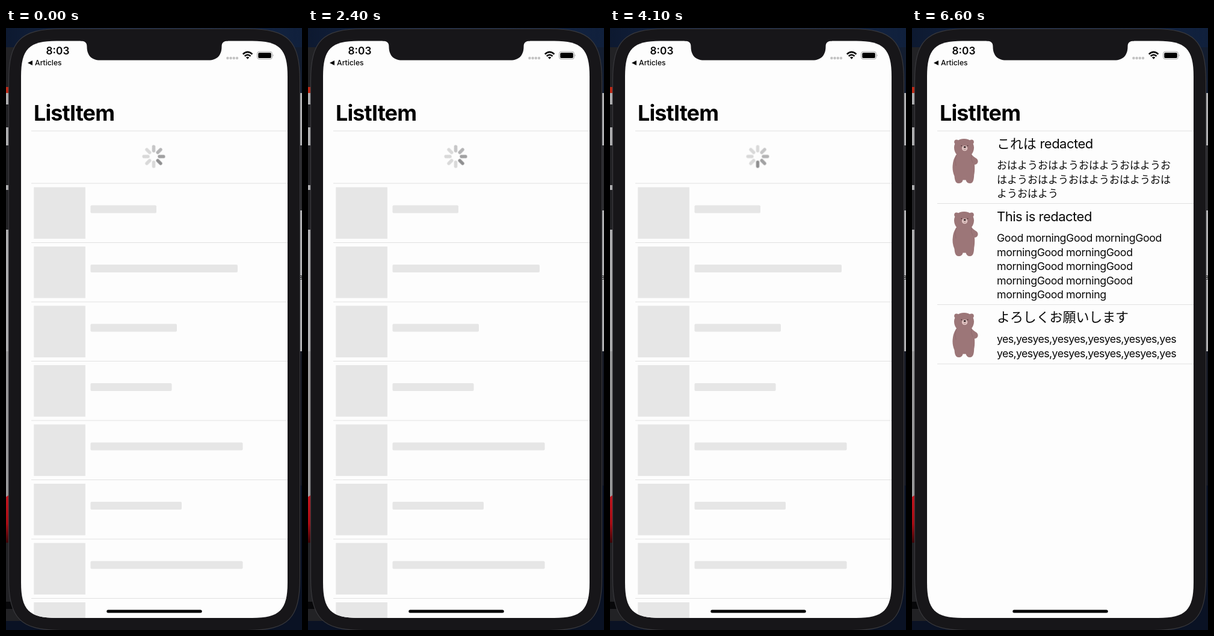
An HTML page for the animation above (6.7 s loop, 492 by 1000 pixels).

```html
<!DOCTYPE html>
<html lang="en">
<head>
<meta charset="utf-8">
<title>Loading list</title>
<style>
  html, body { margin: 0; width: 100%; height: 100%; overflow: hidden; background: #0a1224; }
  svg { display: block; width: 100vw; height: 100vh; }
  text { font-family: Inter, "Noto Sans CJK JP", "Noto Sans CJK", sans-serif; fill: #080808; white-space: pre; }
  .clock { font-size: 17.3px; font-weight: 600; }
  .back { font-size: 12.2px; font-weight: 500; }
  .title { font-size: 36px; font-weight: 700; letter-spacing: -.9px; fill: #000; }
  .head { font-size: 22px; letter-spacing: -.5px; }
  .body { font-size: 17.8px; letter-spacing: -.4px; }
  .yes { letter-spacing: -.62px; }
  .jp { font-size: 17px; letter-spacing: 0; }
  .jp-head { letter-spacing: -.1px; }
  .lines { stroke: #e1e1e1; stroke-width: 1.1; fill: none; }
  .blocks { fill: #e6e6e6; }

  /* one shared 6.7 s clock, nudged so steps land just before each tick */
  .loading, .loaded, .spinner, .cursor { animation: 6.7s linear -10ms infinite; }
  .loading { animation-name: hide; animation-timing-function: step-end; }
  .loaded { animation-name: show; animation-timing-function: step-end; }
  .spinner { animation-name: spin; transform-origin: 0 0; }
  .cursor { animation-name: point; }

  @keyframes hide { 0% { visibility: visible } 62.6866%, 100% { visibility: hidden } }
  @keyframes show { 0% { visibility: hidden } 62.6866%, 100% { visibility: visible } }
  @keyframes spin {
    0% { transform: rotate(135deg); animation-timing-function: steps(29) }
    43.2836% { transform: rotate(1440deg); animation-timing-function: step-end }
    46.2687% { transform: rotate(1530deg); animation-timing-function: steps(11) }
    62.6866%, 100% { transform: rotate(2025deg) }
  }
  @keyframes point {
    0% { transform: translate(476px, 652px); visibility: hidden; animation-timing-function: step-end }
    37.3134% { transform: translate(476px, 652px); visibility: visible; animation-timing-function: ease-out }
    41.791% { transform: translate(152px, 526px); visibility: visible }
    49.2537% { transform: translate(152px, 526px); visibility: visible; animation-timing-function: ease-in }
    53.7313%, 100% { transform: translate(476px, 652px); visibility: hidden }
  }
</style>
</head>
<body>
<svg viewBox="0 0 492 1000" preserveAspectRatio="none">
  <defs>
    <linearGradient id="sky" x2="1" y2="0">
      <stop stop-color="#0d1930"/><stop offset=".4" stop-color="#182a4c"/><stop offset="1" stop-color="#10203c"/>
    </linearGradient>
    <linearGradient id="red" x2="0" y2="1">
      <stop stop-color="#c21620"/><stop offset=".6" stop-color="#a80c14"/><stop offset="1" stop-color="#3a0508"/>
    </linearGradient>
    <path id="display" d="M25 80.5C25 34.7 38.2 21.5 84 21.5H409C454.8 21.5 468 34.7 468 80.5V921C468 966.8 454.8 980 409 980H84C38.2 980 25 966.8 25 921Z"/>
    <clipPath id="screen"><use href="#display"/></clipPath>
    <rect id="spoke" x="-2.7" y="-19" width="5.4" height="12.2" rx="2.7"/>
    <rect id="thumb" x="46.3" y="264.5" width="85.6" height="85.6"/>
    <g id="bear">
      <g fill="#9c7678">
        <circle cx="74" cy="189.3" r="3.8"/><circle cx="99" cy="189.3" r="3.8"/>
        <path d="M86.5 184C96 184 103 190 103 198.5C103 203 101.500 207 99 210C102 214 105 215 107.5 217C111.500 220.500 109.5 227 104 227C104.300 231 104.5 238 103.2 244C103 251 102 258 96.500 258C92.5 258 90.5 256 89.5 252.5H84.5C84 256 81.5 258 77.5 258C72 258 71 252 70.5 246C67.5 239 66.800 232 68 225C69 218 71.5 213.500 74 210C71.5 207 70 203 70 198.5C70 190 77 184 86.5 184Z"/>
      </g>
      <path d="M73.5 211Q71 220 73 229M99 210Q97 218 101 224" fill="none" stroke="#8e696c" stroke-width=".8"/>
      <ellipse cx="87.6" cy="199.7" rx="4.7" ry="4.5" fill="#e0c4c2"/>
      <ellipse cx="87.7" cy="197.7" rx="2" ry="1.5" fill="#352628"/>
      <path d="M85.8 201Q87.7 203 89.6 201" fill="none" stroke="#81595c" stroke-width=".7"/>
      <circle cx="82.3" cy="195.6" r=".8" fill="#3c292b"/><circle cx="92.6" cy="195.6" r=".8" fill="#3c292b"/>
    </g>
  </defs>

  <!-- desktop behind the phone -->
  <rect width="492" height="1000" fill="#0a1224"/>
  <rect width="492" height="32" fill="url(#sky)"/>
  <g>
    <path d="M0 32H25V985H0Z" fill="#222225"/>
    <path d="M0 98H25V108H0Z" fill="#bd2a18"/>
    <path d="M0 108H25V127H0ZM0 165H25V195H0ZM0 261H25V269H0ZM0 335H25V537H0Z" fill="#adadaf"/>
    <path d="M0 537H25V780H0Z" fill="#98989a"/>
    <path d="M0 779L6 775V855H0Z" fill="url(#red)"/>
    <path d="M0 953H25V965H0Z" fill="#08080a"/>
    <path d="M470 32H492V108H470Z" fill="#131d30"/>
    <path d="M470 108H492V195H470ZM470 303H492V537H470Z" fill="#b2b2b4"/>
    <path d="M470 195H492V303H470Z" fill="#2b2b2e"/>
    <path d="M470 537H492V760H470Z" fill="#141823"/>
    <text x="487.5" y="418" font-size="9">8</text>
  </g>

  <!-- phone -->
  <path d="M4.5 88.5C4.5 21 24 1.5 91.5 1.5H401.5C469 1.5 488.5 21 488.5 88.5V913.5C488.5 981 469 1000.5 401.5 1000.5H91.5C24 1000.5 4.5 981 4.5 913.5Z" fill="#171619" stroke="#39393d" stroke-width="1.2"/>
  <use href="#display" fill="#fdfdfd"/>
  <path d="M124 20V21.5C131 21.5 134.5 24 134.5 31C134.5 46 143 53.5 156 53.5H337C350 53.5 358.5 46 358.5 31C358.5 24 362 21.5 369 21.5V20Z" fill="#171619"/>

  <!-- status bar -->
  <text class="clock" x="86" y="44" text-anchor="middle">8:03</text>
  <path d="M36 58L44 54V62Z"/>
  <text class="back" x="48" y="62">Articles</text>
  <g fill="#c3c3c3">
    <circle cx="368.4" cy="50" r="2.2"/><circle cx="373.6" cy="50" r="2.2"/>
    <circle cx="378.8" cy="50" r="2.2"/><circle cx="384" cy="50" r="2.2"/>
  </g>
  <g fill="none" stroke="#050505" stroke-width="2.5">
    <path d="M393.8 43.5Q401.6 36.3 409.4 43.5M396.7 46.7Q401.6 42.3 406.5 46.7"/>
    <path d="M398.9 48.8Q401.6 46.7 404.3 48.8L401.6 51.8Z" fill="#050505" stroke="none"/>
  </g>
  <rect x="417.5" y="39.2" width="25" height="12.6" rx="3.6" fill="none" stroke="#a5a5a5"/>
  <rect x="419.2" y="40.9" width="21.6" height="9.2" rx="2.2"/>
  <path d="M443.7 43.5Q445.7 45.5 443.7 47.5Z" fill="#a5a5a5"/>

  <text class="title" x="46" y="154">ListItem</text>

  <g clip-path="url(#screen)">
    <path class="lines" d="M42 171H468"/>

    <g class="loading">
      <path class="lines" d="M42 258H468M42 356.5H468M42 455H468M42 553.5H468M42 652H468M42 750.5H468M42 849H468M42 947.5H468"/>
      <g class="blocks">
        <use href="#thumb"/><use href="#thumb" y="98.5"/><use href="#thumb" y="197"/><use href="#thumb" y="295.5"/>
        <use href="#thumb" y="394"/><use href="#thumb" y="492.5"/><use href="#thumb" y="591"/><use href="#thumb" y="689.5"/>
        <rect x="140.5" y="294.5" width="109.5" height="13" rx="2"/>
        <rect x="140.5" y="393" width="244.5" height="13" rx="2"/>
        <rect x="140.5" y="491.5" width="143.5" height="13" rx="2"/>
        <rect x="140.5" y="590" width="135" height="13" rx="2"/>
        <rect x="140.5" y="688.5" width="253" height="13" rx="2"/>
        <rect x="140.5" y="787" width="151.5" height="13" rx="2"/>
        <rect x="140.5" y="885.5" width="253" height="13" rx="2"/>
      </g>
      <g transform="translate(245.5 213.5)">
        <g class="spinner" fill="#d9d9d9">
          <use href="#spoke" transform="rotate(180)"/>
          <use href="#spoke" transform="rotate(135)"/>
          <use href="#spoke" transform="rotate(90)"/>
          <use href="#spoke" transform="rotate(45)"/>
          <use href="#spoke" fill="#c6c6c7" transform="rotate(-135)"/>
          <use href="#spoke" fill="#b3b3b4" transform="rotate(-90)"/>
          <use href="#spoke" fill="#a1a1a2" transform="rotate(-45)"/>
          <use href="#spoke" fill="#8f8f90"/>
        </g>
      </g>
    </g>

    <g class="loaded">
      <path class="lines" d="M42 291.5H468M42 459.5H468M42 558H468"/>
      <use href="#bear"/><use href="#bear" y="121"/><use href="#bear" y="289"/>

      <text class="head" x="141" y="200"><tspan class="jp-head">これは</tspan> redacted</text>
      <text class="body jp" y="234">
        <tspan x="141">おはようおはようおはようおはようお</tspan><tspan x="141" dy="23.5">はようおはようおはようおはようおは</tspan><tspan x="141" dy="23.5">ようおはよう</tspan>
      </text>

      <text class="head" x="141" y="321">This is redacted</text>
      <text class="body" y="355">
        <tspan x="141">Good morningGood morningGood</tspan><tspan x="141" dy="23.5">morningGood morningGood</tspan><tspan x="141" dy="23.5">morningGood morningGood</tspan><tspan x="141" dy="23.5">morningGood morningGood</tspan><tspan x="141" dy="23.5">morningGood morning</tspan>
      </text>

      <text class="head jp-head" x="141" y="488">よろしくお願いします</text>
      <text class="body yes" y="523">
        <tspan x="141">yes,yesyes,yesyes,yesyes,yesyes,yes</tspan><tspan x="141" dy="23.5">yes,yesyes,yesyes,yesyes,yesyes,yes</tspan>
      </text>
    </g>
  </g>

  <rect x="167.3" y="966.5" width="158.4" height="5" rx="2.5"/>

  <path class="cursor" d="M0 0V13.5L2.8 11L5 16L7.3 15L5.2 10.1H8.6Z" stroke="#fff" stroke-width="1" paint-order="stroke"/>
</svg>
</body>
</html>
```
